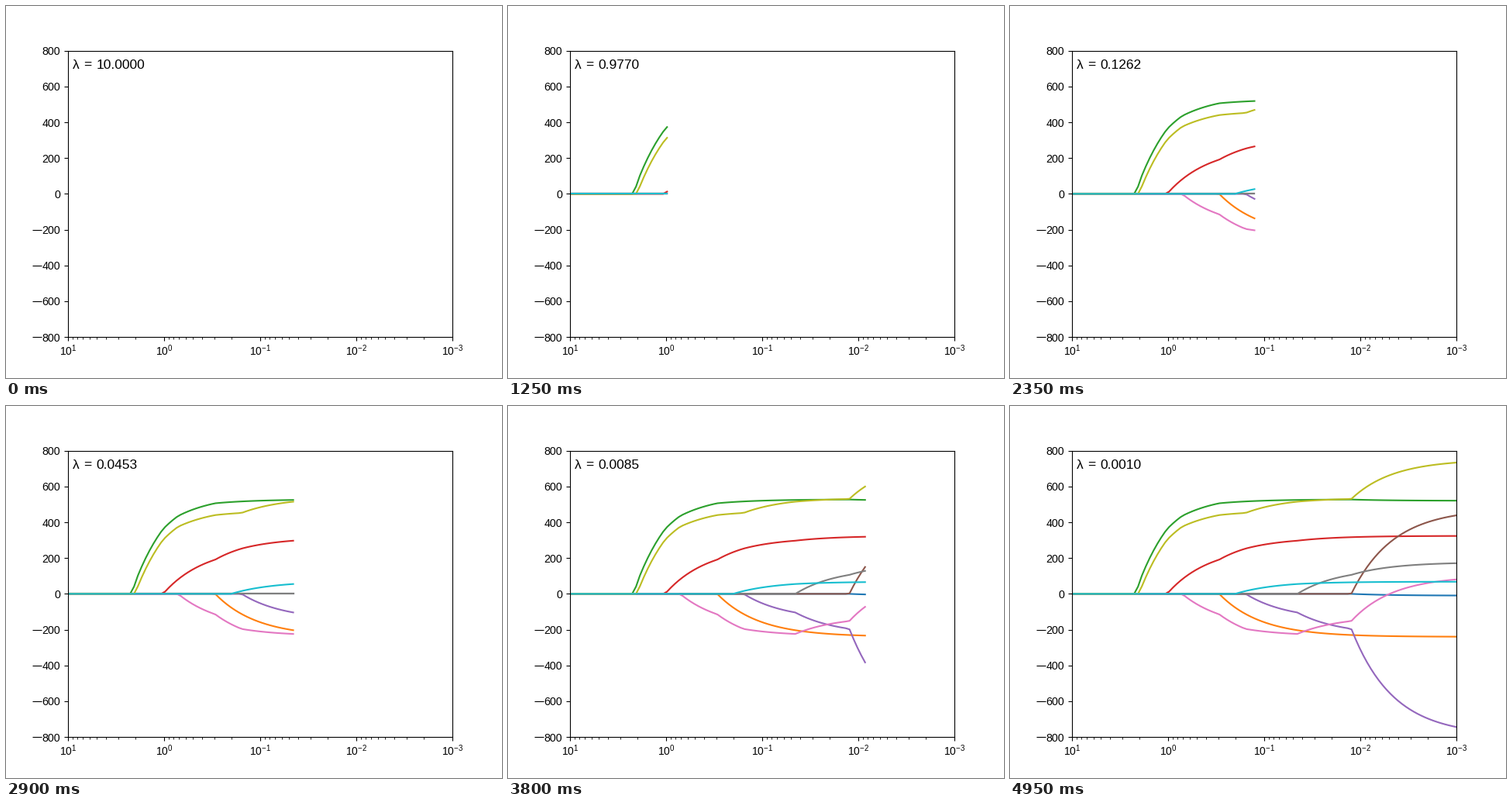
Animation, 640 px wide and 480 px high, one loop 5 s. Source, as a matplotlib script:

```python
import numpy as np
import matplotlib.pyplot as plt
from matplotlib.animation import FuncAnimation
from matplotlib.ticker import FuncFormatter

W, H, DPI = 640, 480, 100
FRAMES, INTERVAL = 100, 50

plt.rcParams["font.family"] = "Liberation Sans"

lambdas = np.logspace(1, -3, FRAMES)

# Lambda at which each further feature enters the model.
ENTRY = [2.148, 2.012, 1.025, 0.715, 0.294, 0.201, 0.156, 0.0452, 0.0124]


def path(start, end, bends=None):
    """Linear in lambda from zero at its entry to `end` at lambda = 0,
    with bends {entry: value} where other features join."""
    keys = {0.0: end, ENTRY[start]: 0.0}
    keys.update({ENTRY[k]: v for k, v in (bends or {}).items()})
    xs = sorted(keys)
    return np.interp(lambdas, xs, [keys[x] for x in xs])


curves = [
    path(8, -10),
    path(4, -240),
    path(0, 520, {1: 60, 2: 362, 3: 435, 4: 506, 8: 527}),
    path(2, 324, {4: 191, 6: 253, 7: 297}),
    path(6, -792, {7: -104, 8: -195}),
    path(8, 477),
    path(3, 101, {4: -114, 6: -196, 7: -224, 8: -152}),
    path(7, 177, {8: 106}),
    path(1, 751, {2: 302, 3: 375, 4: 440, 6: 452, 7: 515, 8: 530}),
    path(5, 68, {7: 55}),
]

fig, ax = plt.subplots(figsize=(W / DPI, H / DPI), dpi=DPI)
ax.set_xscale("log")
ax.set_xlim(10, 1e-3)
ax.set_ylim(-800, 800)
ax.tick_params(axis="x", labelsize=10, pad=2.6)
ax.tick_params(axis="y", labelsize=10.3)

# Negative labels carry a long dash that touches the digits.
ax.yaxis.set_major_formatter(FuncFormatter(lambda v, _: f"{abs(v):.0f}"))
box = ax.get_position()
for v in range(-800, 0, 200):
    y = box.y0 + box.height * (v + 800) / 1600
    fig.add_artist(plt.Line2D([34 / W, 45.5 / W], [y, y], color="black",
                              lw=0.8, solid_capstyle="butt"))

lines = [ax.plot([], [], lw=1.5)[0] for _ in curves]


def label(x, text):
    return fig.text(x / W, 1 - 81 / H, text, fontsize=12.5)


label(86, "λ")
label(100.3, "=")
readout = label(116.3, "")


def draw(frame):
    n = frame + 1
    for line, curve in zip(lines, curves):
        line.set_data(lambdas[:n], curve[:n])
    readout.set_text(f"{lambdas[frame]:.4f}")
    return [*lines, readout]


anim = FuncAnimation(fig, draw, frames=FRAMES, interval=INTERVAL,
                     repeat=True, repeat_delay=0)
plt.show()
```
